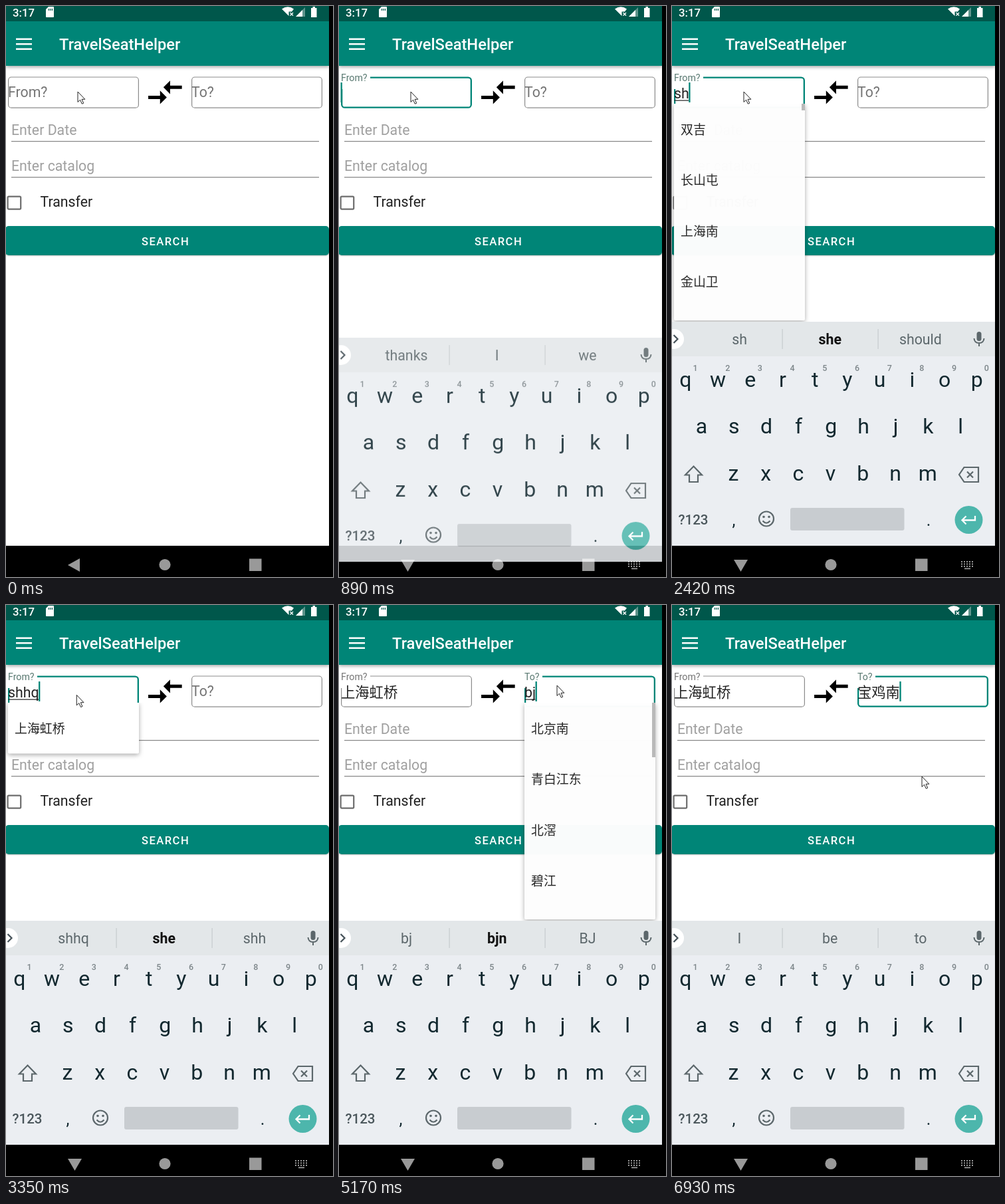
An HTML page with a canvas that plays this animation: 492x859 px, repeating every 7140 ms.

```html
<!DOCTYPE html>
<html lang="en">
<head>
<meta charset="utf-8">
<title>Ticket search</title>
<style>
  html, body { margin: 0; width: 100%; height: 100%; overflow: hidden; background: #000; }
  canvas { display: block; width: 492px; height: 859px; }
</style>
</head>
<body>
<canvas id="stage" width="492" height="859"></canvas>
<script>
const LOOP = 7140, APP_W = 486, KEYS_TOP = 475, NAV_TOP = 812;
const TEAL = '#008577', HINT = '#757575', INK = '#222';
const FAMILY = 'Roboto, "Noto Sans CJK SC", "Noto Sans CJK", sans-serif';
const stage = document.getElementById('stage').getContext('2d');
const keysCanvas = document.createElement('canvas');
keysCanvas.width = APP_W;
keysCanvas.height = 859 - KEYS_TOP;
const keys = keysCanvas.getContext('2d');
let g = stage;

// Timed states: [start, value...]
const FROM_TEXT = [[0, ''], [1390, 's'], [2220, 'sh'], [2660, 'shh'], [3010, 'shhq'], [3560, '上海虹桥']];
const TO_TEXT = [[0, ''], [4640, 'b'], [4960, 'bj'], [5460, 'bjn'], [6250, '宝鸡南']];
const SUGGESTIONS = [
  [0, 'thanks I we'], [1390, 's a so', 1], [2220, 'sh she should', 1], [2660, 'shh she shhh', 1],
  [3010, 'shhq she shh', 1], [3640, 'I be to'], [4270, 'thanks I we'], [4640, 'b be by', 1],
  [4960, 'bj bjn BJ', 1], [5460, 'bjn bin BJN', 1], [6320, 'I be to']
];
const CARET = [[0, 0], [450, 1], [1170, 0], [1390, 1], [1690, 0], [2010, 1],
               [4500, 0], [4640, 1], [6610, 0], [6930, 1]];
const FROM_LIST = [
  [0, '双吉 长山屯 上海南 金山卫', 10], [2660, '上海虹桥 上海南 双河 沙河市', 60], [3010, '上海虹桥', 0]
];
const TO_LIST = [[0, '北京南 青白江东 北滘 碧江', 82], [5460, '北京南 宝鸡南', 0]];
const POINTER = [[0, 108, 129], [3310, 108, 129], [3510, 92, 188], [3620, 92, 188],
                 [3910, 321, 127], [3970, 328, 121], [5800, 328, 121], [6200, 376, 258]];

const clamp = v => Math.max(0, Math.min(1, v));
const ramp = (t, start, length) => clamp((t - start) / length);
const smooth = v => v * v * (3 - 2 * v);
const mix = (a, b, v) => a + (b - a) * v;
const at = (states, t) => states.findLast(state => state[0] <= t);

function rect(x, y, w, h, color) {
  g.fillStyle = color;
  g.fillRect(x, y, w, h);
}
function round(x, y, w, h, r) {
  g.beginPath();
  g.roundRect(x, y, w, h, r);
}
function disc(x, y, r, color) {
  g.fillStyle = color;
  g.beginPath();
  g.arc(x, y, r, 0, 7);
  g.fill();
}
function fillPath(d, color) {
  g.fillStyle = color;
  g.fill(new Path2D(d));
}
function strokePath(d, color, width) {
  g.strokeStyle = color;
  g.lineWidth = width;
  g.stroke(new Path2D(d));
}
function text(s, x, y, size, color, weight = 400, align = 'left') {
  g.font = `${weight} ${size}px ${FAMILY}`;
  g.fillStyle = color;
  g.textAlign = align;
  g.fillText(s, x, y);
}
function shadow(blur, alpha, dy) {
  g.shadowColor = `rgba(0,0,0,${alpha})`;
  g.shadowBlur = blur;
  g.shadowOffsetY = dy;
}
const noShadow = () => shadow(0, 0, 0);

function drawHeader() {
  shadow(5, .35, 2);
  rect(0, 0, APP_W, 90, TEAL);
  noShadow();
  rect(0, 0, APP_W, 23, '#00574b');
  text('3:17', 10, 15.5, 16.8, '#fff', 500);
  fillPath('M64 1H71Q72 1 72 2V16Q72 17 71 17H61Q60 17 60 16V5Z', '#fff');
  strokePath('M64.5 4V7M67 4V7M69.5 4V7', '#00574b', 1.2);
  fillPath('M415 4.5Q424 -2 433 4.5L430 8.5H425.5V15Z', '#fff');
  strokePath('M427.5 10L432 14.5M432 10L427.5 14.5', '#fff', 1.4);
  fillPath('M436 16L450 2V16Z', '#5f948c');
  fillPath('M436 16L446 6V16Z', '#fff');
  fillPath('M459 3H461.5V1H465V3H467.5V17H459Z', '#fff');
  strokePath('M15 49.7H39M15 57.2H39M15 64.7H39', '#fff', 2.4);
  text('TravelSeatHelper', 80, 66, 23.7, '#fff', 500);
}

function drawForm() {
  for (const [label, y] of [['Enter Date', 194], ['Enter catalog', 248]]) {
    text(label, 8, y, 21.3, '#a0a0a0');
    rect(8, y + 9, 463, 1.2, '#858585');
  }
  g.strokeStyle = '#6d6d6d';
  g.lineWidth = 2.2;
  round(2.6, 286.6, 19.6, 19, 1.5);
  g.stroke();
  text('Transfer', 51.5, 302, 21.3, INK);
  g.fillStyle = TEAL;
  shadow(2, .25, 1);
  round(-1, 331, 487, 44, 5);
  g.fill();
  noShadow();
  g.letterSpacing = '1.45px';
  text('SEARCH', 204, 359.5, 16.6, '#fff', 500);
  g.letterSpacing = '0px';
  g.save();
  g.translate(209, 99.5);
  g.scale(2.53, 2.53);
  fillPath('M9 14H2v2h7v3L13 15 9 11zM15 13v-3H22V8H15V5L11 9z', '#000');
  g.restore();
}

function drawField(x, label, gap, value, focused, float, composing, caret) {
  const width = focused ? 2.3 : 1.2;
  g.strokeStyle = focused ? TEAL : '#8b8b8b';
  g.lineWidth = width;
  round(x + width / 2, 106.4 + width / 2, 197 - width, 47.4 - width, 4.5);
  g.stroke();
  if (float > 0) rect(x - 1, 100, gap * float + 1, 25, '#fff');
  text(label, x, mix(137, 113, float), mix(21.3, 14.2, float), focused ? '#587870' : HINT);
  text(value, x, 138.5, 21.3, INK);
  const end = x + g.measureText(value).width;
  if (composing && value) rect(x + .5, 141.5, end - x - 1, 1.2, INK);
  if (caret) rect(end - .5, 115, 2.3, 30, TEAL);
}

function drawList(x, list, alpha, barAlpha) {
  if (alpha <= 0) return;
  const items = list[1].split(' ');
  const height = items.length > 3 ? 326 : items.length * 76.5;
  g.save();
  g.beginPath();
  g.rect(0, 147, APP_W, KEYS_TOP - 147);
  g.clip();
  g.globalAlpha = alpha;
  g.fillStyle = '#fff';
  shadow(7, .35, 2);
  round(x, 147, 197, height, [0, 0, 2, 2]);
  g.fill();
  noShadow();
  items.forEach((item, i) => text(item, x + 10, 192.7 + i * 76.4, 18.9, INK));
  g.globalAlpha = alpha * barAlpha;
  rect(x + 192, 147, 5, list[2], '#b8b8b8');
  g.restore();
}

function drawPointer(t) {
  const i = POINTER.findLastIndex(p => p[0] <= t);
  const a = POINTER[i], b = POINTER[i + 1] || a;
  const p = smooth(ramp(t, a[0], b[0] - a[0] || 1));
  g.save();
  g.translate(mix(a[1], b[1], p), mix(a[2], b[2], p));
  const arrow = 'M0 0V15.5L3.6 12.2 6.3 18.2 8.7 17.2 6.1 11.3H10.8Z';
  fillPath(arrow, '#fff');
  strokePath(arrow, '#222', 1);
  g.restore();
}

// Keyboard, drawn in its own space with the suggestion strip at the top
function drawKeys(t) {
  const dark = '#12282f', grey = '#5c676b', pitch = 48.7;
  g = keys;
  g.save();
  g.translate(0, -KEYS_TOP);
  rect(0, KEYS_TOP, APP_W, 384, '#ebeef2');
  rect(0, KEYS_TOP, APP_W, 52, '#e3e7e9');
  rect(0, NAV_TOP, APP_W, 47, '#000');

  disc(3, 501, 15, '#fff');
  strokePath('M2.5 495L8.5 501 2.5 507', '#455158', 2.2);
  rect(165.5, 486, 1.2, 30, '#c6cbce');
  rect(309.5, 486, 1.2, 30, '#c6cbce');
  const [, words, bold] = at(SUGGESTIONS, t);
  words.split(' ').forEach((word, i) => {
    const strong = bold && i === 1;
    text(word, 101.5 + i * 136.2, 509, 21.3, strong ? '#111' : grey, strong ? 700 : 400, 'center');
  });
  g.fillStyle = grey;
  round(458.5, 490, 7, 14, 3.5);
  g.fill();
  strokePath('M454.5 500Q455 507 462 507T469.500 500M462 507V512', grey, 2);

  [['qwertyuiop', 20.4, 573], ['asdfghjkl', 44.5, 643], ['zxcvbnm', 92.5, 713.5]].forEach(([row, x, y]) =>
    [...row].forEach((letter, i) => text(letter, x + i * pitch, y, 32, dark, 400, 'center')));
  [...'1234567890'].forEach((digit, i) =>
    text(digit, 35 + i * pitch, 549, 12.5, '#7d868a', 500, 'center'));

  strokePath('M32.500 692.5L45 705.5H39V716H26V705.500H20Z', grey, 2.2);
  strokePath('M439.5 694H461V716H439.5L432 705ZM444 700.5L453 709.5M453 700.5L444 709.500', grey, 2.2);
  text('?123', 32, 779.5, 20.5, '#4a565b', 500, 'center');
  text(',', 93, 782, 25, dark, 400, 'center');
  text('.', 386, 782, 25, dark, 400, 'center');
  g.strokeStyle = grey;
  g.lineWidth = 2.2;
  g.beginPath();
  g.arc(142, 771.500, 11, 0, 7);
  g.stroke();
  disc(138, 768.5, 1.8, grey);
  disc(146, 768.5, 1.8, grey);
  strokePath('M136.5 774.5Q142 781 147.5 774.5', grey, 2.2);
  g.fillStyle = '#c8ccd0';
  round(178, 755, 171.500, 34, 3);
  g.fill();
  disc(446.500, 773, 21, '#4db6ac');
  strokePath('M456 767V773.5H437M442.5 767.5L436.5 773.5 442.5 779.500', '#fff', 2.3);
  g.restore();
  g = stage;
}

function drawNavIcons(open) {
  const color = 'rgba(255,255,255,.6)';
  fillPath(open ? 'M93 833H114L103.5 851Z' : 'M93 841L111 831V851Z', color);
  disc(239, 840.5, 8.6, color);
  rect(366, 831.500, 18.5, 18.5, color);
  if (!open) return;
  for (let row = 0; row < 3; row++)
    for (let col = 0; col < 5; col++) rect(435 + col * 4, 835 + row * 3.500, 2, 2, color);
  rect(440, 845.5, 9, 1.8, color);
}

function draw(t) {
  rect(0, 0, 492, 859, '#000');
  rect(0, 0, APP_W, NAV_TOP, '#fff');
  drawHeader();
  drawForm();

  const caret = at(CARET, t)[1];
  const onFrom = t >= 420 && t < 4080, onTo = t >= 4080;
  drawField(3, 'From?', 44, at(FROM_TEXT, t)[1], onFrom, smooth(ramp(t, 420, 170)), t < 3560, caret && onFrom);
  drawField(279, 'To?', 27, at(TO_TEXT, t)[1], onTo, smooth(ramp(t, 4080, 170)), t < 6250, caret && onTo);

  drawList(3, at(FROM_LIST, t), ramp(t, 2250, 175) - ramp(t, 3560, 150), 1 - ramp(t, 2700, 210));
  drawList(279, at(TO_LIST, t), ramp(t, 4995, 180) - ramp(t, 6250, 150), 1);

  const shown = 1 - (1 - ramp(t, 750, 200)) ** 1.6;
  if (shown > 0) {
    drawKeys(t);
    g.globalAlpha = shown;
    g.drawImage(keysCanvas, 0, KEYS_TOP + 170 * (1 - shown));
    g.globalAlpha = 1;
  }
  drawNavIcons(shown > 0);
  drawPointer(t);
}

function tick() {
  draw(performance.now() % LOOP);
  requestAnimationFrame(tick);
}
tick();
</script>
</body>
</html>
```
